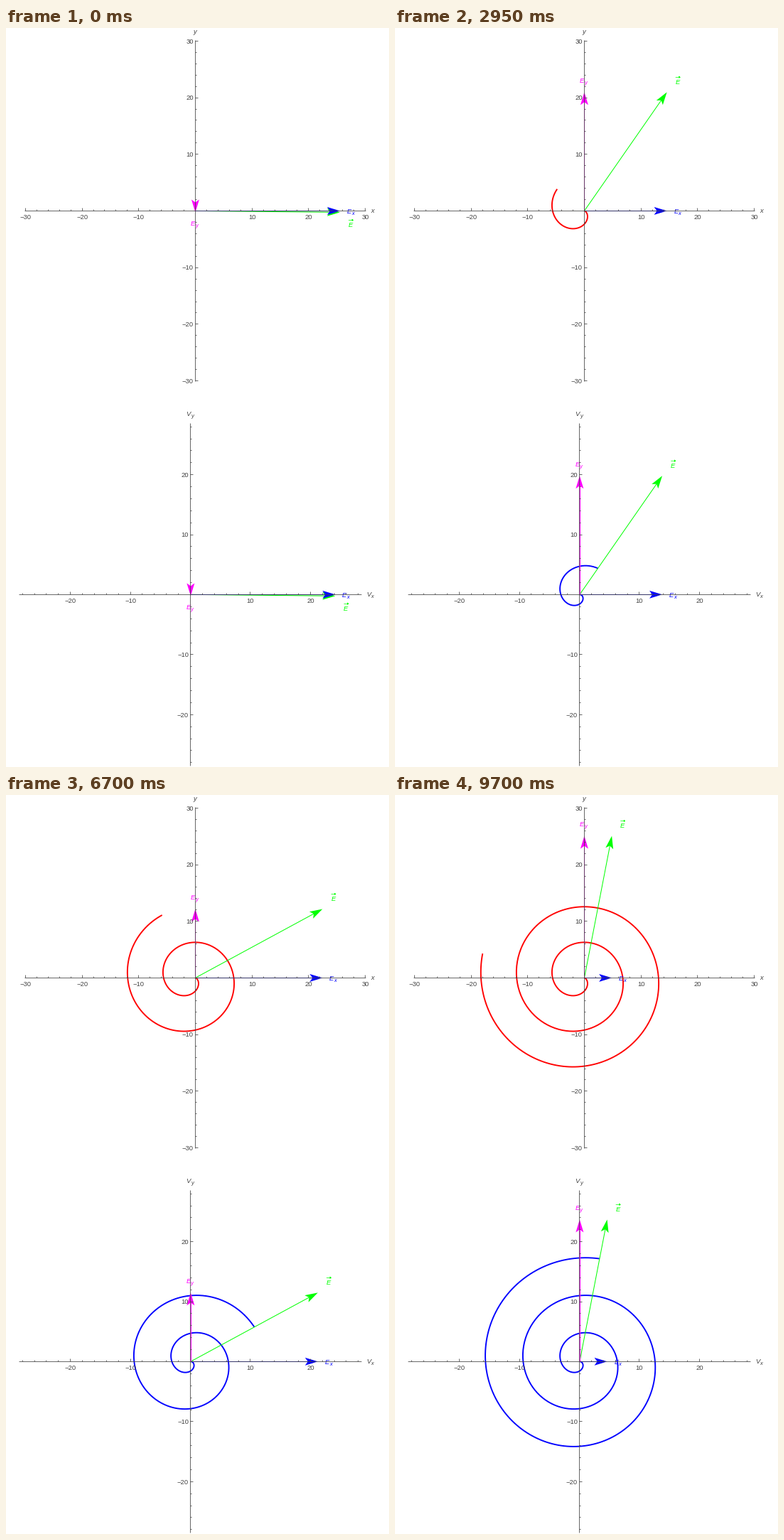
A matplotlib script for the animation above (9750 ms loop, 539x1040 px).

```python
import matplotlib.pyplot as plt
import numpy as np
from matplotlib.animation import FuncAnimation

W, H, DPI = 539, 1040, 100
FRAMES, START, STEP = 195, 0.01, 0.09
PX = 72 / DPI              # points per pixel
FIELD = 203.5              # length of the field vector in pixels
GAP = 16                   # distance from arrow tip to its label
GREY = "#444444"

plt.rcParams["font.family"] = "Liberation Sans"

fig = plt.figure(figsize=(W / DPI, H / DPI), dpi=DPI, facecolor="white")
ax = fig.add_axes([0, 0, 1, 1])
ax.set_xlim(0, W)
ax.set_ylim(H, 0)
ax.axis("off")


def text(x, y, s, size=9.5, color=GREY, ha="center", style="normal", z=6):
    return ax.text(x, y, s, fontsize=size * PX, color=color, ha=ha,
                   va="baseline", style=style, zorder=z)


class Symbol:
    """Italic letter with a subscript, centred on a point."""

    def __init__(self, main, sub, color, z=4):
        self.main = text(0, 0, main, 9.5, color, "right", "italic", z)
        self.sub = text(0, 0, sub, 7.8, color, "left", "italic", z)

    def move(self, x, y):
        self.main.set_position((x + 1, y + 3.4))
        self.sub.set_position((x + 1, y + 5.4))


class VectorSymbol:
    """Italic letter under a small arrow."""

    def __init__(self, main, color):
        self.main = text(0, 0, main, 9.5, color, "center", "italic", 4)
        self.bar, = ax.plot([], [], color=color, lw=0.7 * PX, zorder=4)

    def move(self, x, y):
        self.main.set_position((x, y + 5))
        xs = x + np.array([-2.5, 3.5, 2, 3.5, 2])
        ys = y - 4.5 + np.array([0, 0, -1.2, 0, 1.2])
        self.bar.set_data(xs, ys)


class Arrow:
    HEAD = np.array([[0, 0], [-18, 5.5], [-14, 0], [-18, -5.5]])

    def __init__(self, color):
        self.line, = ax.plot([], [], color=color, lw=PX, zorder=3,
                             solid_capstyle="butt")
        self.head, = ax.fill([0, 0, 0], [0, 0, 0], color=color, lw=0, zorder=3)

    def move(self, origin, length, angle):
        u = np.array([np.cos(angle), np.sin(angle)])
        tip = origin + length * u
        end = origin + max(length - 14, 0) * u
        self.line.set_data([origin[0], end[0]], [origin[1], end[1]])
        turn = np.array([u, [-u[1], u[0]]])
        self.head.set_xy(tip + self.HEAD @ turn)
        return tip


def draw_axes(cx, cy, unit, reach, last):
    # Whole-number positions snap to the middle of that pixel.
    style = dict(colors=GREY, lw=PX, alpha=0.8, zorder=5)
    ax.hlines(cy, cx - reach, cx + reach, **style)
    ax.vlines(cx, cy - reach, cy + reach, **style)
    ticks = np.array([v for v in range(-last, last + 1, 2) if v])
    size = np.where(ticks % 10 == 0, 4, 2)
    ax.vlines(cx + ticks * unit, cy - size, cy, **style)
    ax.hlines(cy - ticks * unit, cx, cx + size, **style)
    for v in ticks[ticks % 10 == 0]:
        s = str(v).replace("-", "\u2212")
        text(cx + v * unit + 0.5, cy + 12, s)
        text(cx - 2, cy - v * unit + 3.8, s, ha="right")


class Panel:
    def __init__(self, origin, unit, path, color):
        self.origin, self.unit, self.path = np.array(origin), unit, path
        self.trace, = ax.plot([], [], color=color, lw=1.9 * PX, zorder=2,
                              solid_capstyle="butt")
        self.e = Arrow("#00ff00")
        self.ex = Arrow("#0000ff")
        self.ey = Arrow("#ff00ff")
        self.e_name = VectorSymbol("E", "#00ff00")
        self.ex_name = Symbol("E", "x", "#0000ff")
        self.ey_name = Symbol("E", "y", "#ff00ff")

    def update(self, t):
        x, y = self.path(np.linspace(0, t, 500))
        self.trace.set_data(self.origin[0] + self.unit * x,
                            self.origin[1] - self.unit * y)

        c, d = np.cos(t), np.sin(t)
        sx, sy = (1 if c > 0 else -1), (1 if d > 0 else -1)
        tx, ty = self.e.move(self.origin, FIELD, t)
        self.ex.move(self.origin, FIELD * abs(c), 0 if sx > 0 else np.pi)
        self.ey.move(self.origin, FIELD * abs(d), sy * np.pi / 2)
        self.e_name.move(tx + sx * GAP - 1, ty + sy * GAP - 0.5)
        self.ex_name.move(tx + sx * GAP - 1, self.origin[1])
        self.ey_name.move(self.origin[0] - 1, ty + sy * GAP - 1)


def position(s):
    return s * np.sin(s) + np.cos(s) - 1, s * np.cos(s) - np.sin(s)


def velocity(s):
    return s * np.cos(s), -s * np.sin(s)


draw_axes(266, 257, 7.97, 240, 30)
text(515.5, 260, "x", style="italic")
text(266, 8, "y", style="italic")

draw_axes(259, 797, 8.44, 241, 28)
Symbol("V", "x", GREY, 6).move(512.5, 797)
Symbol("V", "y", GREY, 6).move(259, 542.5)

panels = [
    Panel((266.45, 257.4), 7.97, position, "#ff0000"),
    Panel((259.9, 797.3), 8.44, velocity, "#0000ff"),
]


def update(i):
    for panel in panels:
        panel.update(START + i * STEP)
    return []


anim = FuncAnimation(fig, update, frames=FRAMES, interval=50, repeat=True,
                     repeat_delay=0, blit=False)
plt.show()
```
